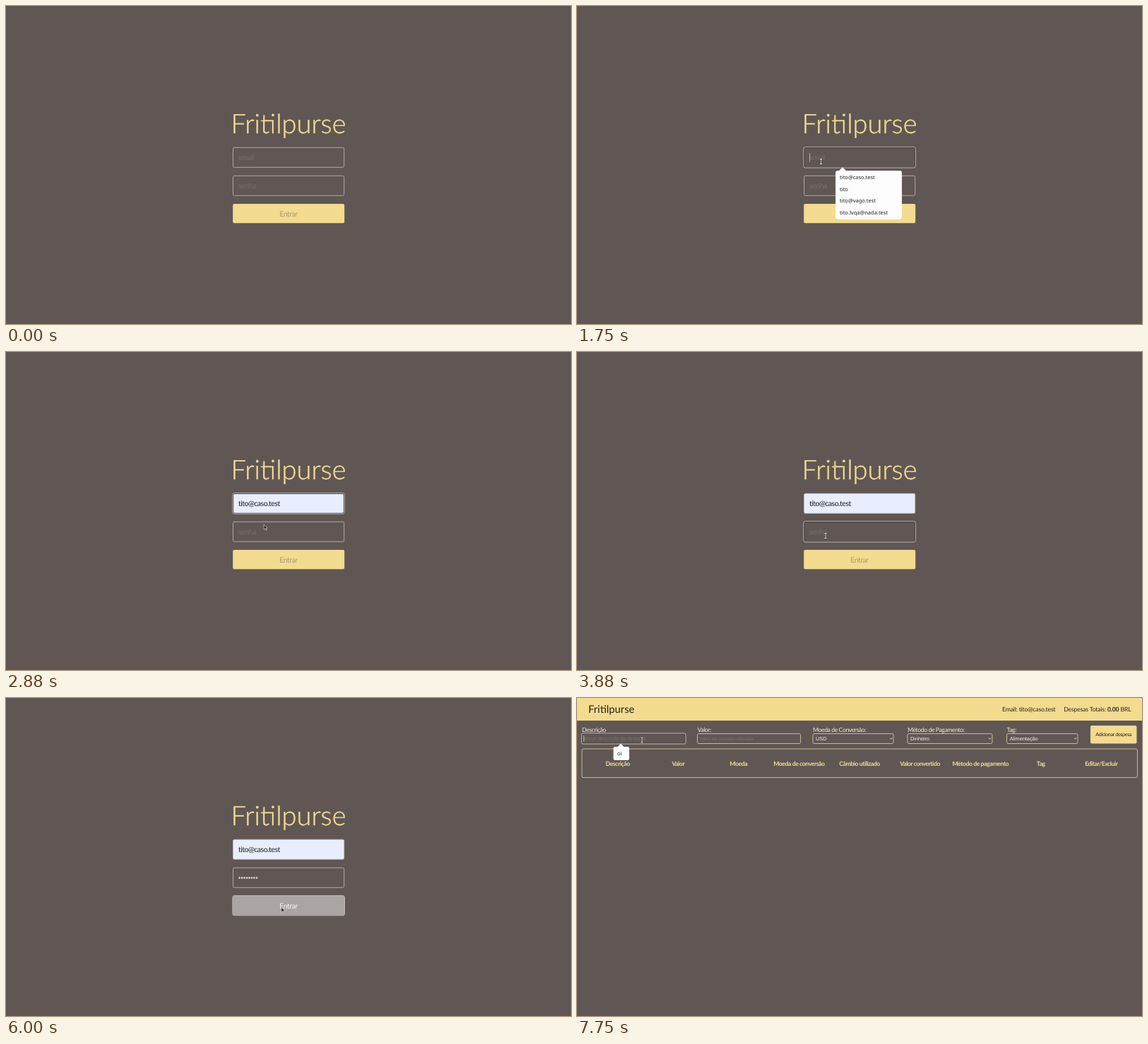
These frames come from a looping animation (800x450 px, 8000 ms). An HTML page:

```html
<!DOCTYPE html>
<html lang="pt">
<head>
<meta charset="utf-8">
<title>Carteira</title>
<style>
html, body { margin: 0; width: 100%; height: 100%; overflow: hidden; background: #605755; }
svg { display: block; width: 100vw; height: 100vh; }
text { font-family: Lato, sans-serif; letter-spacing: -.05em; text-rendering: geometricPrecision; white-space: pre; }
.title { font-size: 38px; font-weight: 300; letter-spacing: 0; fill: #f3dd92; stroke: #f3dd92; stroke-width: .4; text-anchor: middle; }
.brand { font-size: 14.8px; letter-spacing: 0; fill: #26211d; }
.field { font-size: 10.6px; }
.hint { fill: #766d6a; }
.pick { font: 7.5px "Noto Sans", sans-serif; letter-spacing: 0; fill: #222; }
.arial { font-family: "Liberation Sans", sans-serif; letter-spacing: 0; }
.bar { font-size: 8.7px; letter-spacing: -.02em; fill: #2a2520; }
.label { font-size: 8.7px; fill: #f2e9d4; }
.head { font-size: 8.7px; font-weight: 700; fill: #f3db8f; text-anchor: middle; }
.mid { text-anchor: middle; }
.end { text-anchor: end; }
.box { fill: none; stroke: #c3bcb9; stroke-width: .8; }
.gold { fill: none; stroke: #d9c68b; stroke-width: .9; }
.ring { fill: none; stroke: #d5d0cd; stroke-width: .8; }
.inner { fill: none; stroke: #37302e; stroke-width: 1.1; }
.popup { fill: #fdfdfe; filter: drop-shadow(0 .4px .5px #0006); }
.caret { stroke: #c9c3c0; stroke-width: .8; }
</style>
</head>
<body>
<svg viewBox="0 0 800 450" preserveAspectRatio="none">
  <rect width="800" height="450" fill="#605755"/>

  <g id="login">
    <text class="title" x="400" y="180">Fritilpurse</text>
    <rect id="mailBox" class="box" x="321.5" y="200.3" width="157.2" height="28" rx="2"/>
    <text id="mailHint" class="field hint" x="329" y="218">email</text>
    <text id="mailPreview" class="arial" x="329" y="218" font-size="6.4" fill="#222">tito@caso.test</text>
    <text id="mailText" class="field" x="329" y="218" fill="#222">tito@caso.test</text>
    <g id="mailFocus">
      <rect class="inner" x="321.6" y="200.4" width="157" height="27.8" rx="2"/>
      <rect class="ring" x="320.8" y="199.6" width="158.6" height="29.4" rx="2.6"/>
    </g>
    <path id="mailCaret" class="caret" d="M329.5 208v13"/>

    <rect class="box" x="321.5" y="240.3" width="157.2" height="28" rx="2"/>
    <text id="passHint" class="field hint" x="329" y="258">senha</text>
    <g id="dots" fill="#eae6e3"></g>
    <g id="passFocus">
      <rect class="inner" x="321.6" y="240.4" width="157" height="27.8" rx="2"/>
      <rect class="ring" x="320.8" y="239.6" width="158.6" height="29.4" rx="2.6"/>
    </g>
    <path id="passCaret" class="caret" d="M0 248v13"/>

    <rect id="enter" x="321.2" y="280" width="158" height="27.3" rx="2"/>
    <rect id="enterRing" class="ring" x="320.8" y="279.6" width="158.7" height="28.2" rx="2.6"/>
    <text id="enterText" class="field mid" x="400" y="298">Entrar</text>

    <g id="mailList">
      <path class="popup" d="M369 233h2l5-5 5 5h76q3 0 3 3v63q0 3-3 3h-88q-3 0-3-3v-63q0-3 3-3z"/>
      <rect id="mailHover" x="366" y="234" width="94" height="17" fill="#e3e2e1"/>
      <text class="pick" x="372" y="245">tito@caso.test</text>
      <text class="pick" x="372" y="261.5">tito</text>
      <text class="pick" x="372" y="278">tito@vago.test</text>
      <text class="pick" x="372" y="294.5">tito.lvqa@nada.test</text>
    </g>
  </g>

  <g id="wallet">
    <rect width="800" height="32" fill="#f3db8f"/>
    <text class="brand" x="16" y="21">Fritilpurse</text>
    <text class="bar" x="602" y="19">Email: tito@caso.test</text>
    <text class="bar end" x="784.5" y="19">Despesas Totais: <tspan font-weight="700">0.00</tspan> BRL</text>
    <g id="form"></g>
    <rect x="727" y="39" width="65.5" height="25.5" rx="2" fill="#f3db8f"/>
    <text class="mid" x="759.7" y="54" font-size="7.2" fill="#26211d">Adicionar despesa</text>
    <rect class="gold" x="7" y="72" width="786.5" height="40.5" rx="2"/>
    <g id="heads"></g>
    <g id="descFocus">
      <rect class="inner" x="7.2" y="50.7" width="146" height="13.5" rx="1.6"/>
      <rect class="ring" x="6.4" y="49.9" width="147.6" height="15.1" rx="2.2"/>
      <path class="caret" d="M9.6 53v9"/>
      <path class="popup" d="M53.5 69H57.5l4.5-4.5 4.5 4.5H72q2 0 2 2v15q0 2-2 2H53.5q-2 0-2-2V71q0-2 2-2z"/>
      <text class="pick" x="57" y="81">oi</text>
    </g>
  </g>

  <g id="cursor">
    <path id="arrow" d="M0 0V7.2L1.7 5.7 2.9 8.4 4 7.9 2.8 5.3H5Z" fill="#222" stroke="#eee" stroke-width=".6"/>
    <g id="beam" fill="none">
      <path d="M-1.5-3.5h3M0-3.5v7M-1.5 3.5h3" stroke="#2a2523" stroke-width="2.2"/>
      <path d="M-1.5-3.5h3M0-3.5v7M-1.5 3.5h3" stroke="#eee"/>
    </g>
  </g>
</svg>
<script>
const LOOP = 8000, STEP = 125;
const $ = id => document.getElementById(id);
const NS = 'http://www.w3.org/2000/svg';

function add(parent, tag, attrs, text = '') {
  const el = document.createElementNS(NS, tag);
  for (const key in attrs) el.setAttribute(key, attrs[key]);
  el.textContent = text;
  parent.append(el);
  return el;
}

// label, left, right, content, is a select
[
  ['Descrição', 7, 153.5, 'Breve descrição da despesa', false],
  ['Valor:', 170.5, 316.5, 'Valor da moeda utilizada', false],
  ['Moeda de Conversão:', 334, 448, 'USD', true],
  ['Método de Pagamento:', 468, 588, 'Dinheiro', true],
  ['Tag:', 608.5, 709, 'Alimentação', true]
].forEach(([label, x, right, content, select]) => {
  const form = $('form');
  add(form, 'text', { class: 'label', x, y: 48 }, label);
  add(form, 'rect', { class: 'gold', x, y: 50.5, width: right - x, height: 14, rx: 2 });
  add(form, 'text', {
    class: 'arial', x: x + (select ? 4 : 2.5), y: 60,
    'font-size': select ? 7.3 : 7, fill: select ? '#f5f2ee' : '#7a726e'
  }, content);
  if (select) add(form, 'path', {
    d: `M${right - 5} 56.5l1.6 1.7 1.6-1.7`, fill: 'none', stroke: '#f5f2ee', 'stroke-width': .9
  });
});

['Descrição', 'Valor', 'Moeda', 'Moeda de conversão', 'Câmbio utilizado', 'Valor convertido',
  'Método de pagamento', 'Tag', 'Editar/Excluir'].forEach((name, i) =>
  add($('heads'), 'text', { class: 'head', x: 57.6 + 85.6 * i, y: 95.5 }, name));

const dots = Array.from({ length: 8 }, (_, i) =>
  add($('dots'), 'circle', { cx: 330.6 + 3.5 * i, cy: 254.5, r: 1.25 }));

// Steps at which each password character appears
const KEYS = [32, 34, 35, 37, 39, 42, 43, 44];

// Pointer moves: first step, last step, from, to
const MOVES = [
  [3, 8, 189, 282, 345.5, 220],
  [15, 20, 345.5, 220, 367.5, 241],
  [22, 26, 367.5, 241, 352, 260],
  [44, 48, 352, 260, 389.8, 296],
  [52, 57, 389.8, 296, 92, 59.5]
];

const ease = p => p * p * (3 - 2 * p);

function pointer(n) {
  const [a, b, x0, y0, x1, y1] = MOVES.filter(m => n >= m[0]).pop() || MOVES[0];
  const p = ease(Math.min(1, Math.max(0, (n - a) / (b - a))));
  return [x0 + (x1 - x0) * p, y0 + (y1 - y0) * p];
}

const show = (id, on) => { $(id).style.display = on ? '' : 'none'; };

function draw(time) {
  const n = Math.floor(time / STEP);
  const within = (a, b) => n >= a && n < b;
  const typed = KEYS.filter(k => n >= k).length;
  const preview = within(20, 22), filled = n >= 22, hover = n >= 47;

  show('login', n < 49);
  show('wallet', n >= 49);

  $('mailBox').style.fill = preview || filled ? '#e8eefd' : 'none';
  show('mailHint', n < 20);
  show('mailPreview', preview);
  show('mailText', filled);
  show('mailFocus', within(14, 27));
  show('mailCaret', within(14, 18));
  show('mailList', within(14, 22));
  show('mailHover', preview);

  show('passHint', !typed);
  dots.forEach((dot, i) => { dot.style.display = i < typed ? '' : 'none'; });
  show('passFocus', within(27, 48));
  show('passCaret', within(27, 31) || within(32, 48));
  $('passCaret').setAttribute('transform', `translate(${329.5 + 3.5 * typed})`);

  $('enter').style.fill = hover ? '#aaa5a3' : '#f3db8f';
  $('enterText').style.fill = hover ? '#f4f2f0' : typed > 5 ? '#554c48' : '#a99b73';
  show('enterRing', n >= 48);
  show('descFocus', n >= 59);

  const [x, y] = pointer(n);
  const beam = within(8, 16) || within(25, 45) || n >= 57;
  $('cursor').setAttribute('transform', `translate(${x} ${y})`);
  $('cursor').style.opacity = within(20, 22) ? .3 : 1;
  show('cursor', n >= 3 && !within(32, 44));
  show('beam', beam);
  show('arrow', !beam);
}

const start = performance.now();
function tick() {
  draw((performance.now() - start) % LOOP);
  requestAnimationFrame(tick);
}
tick();
</script>
</body>
</html>
```
